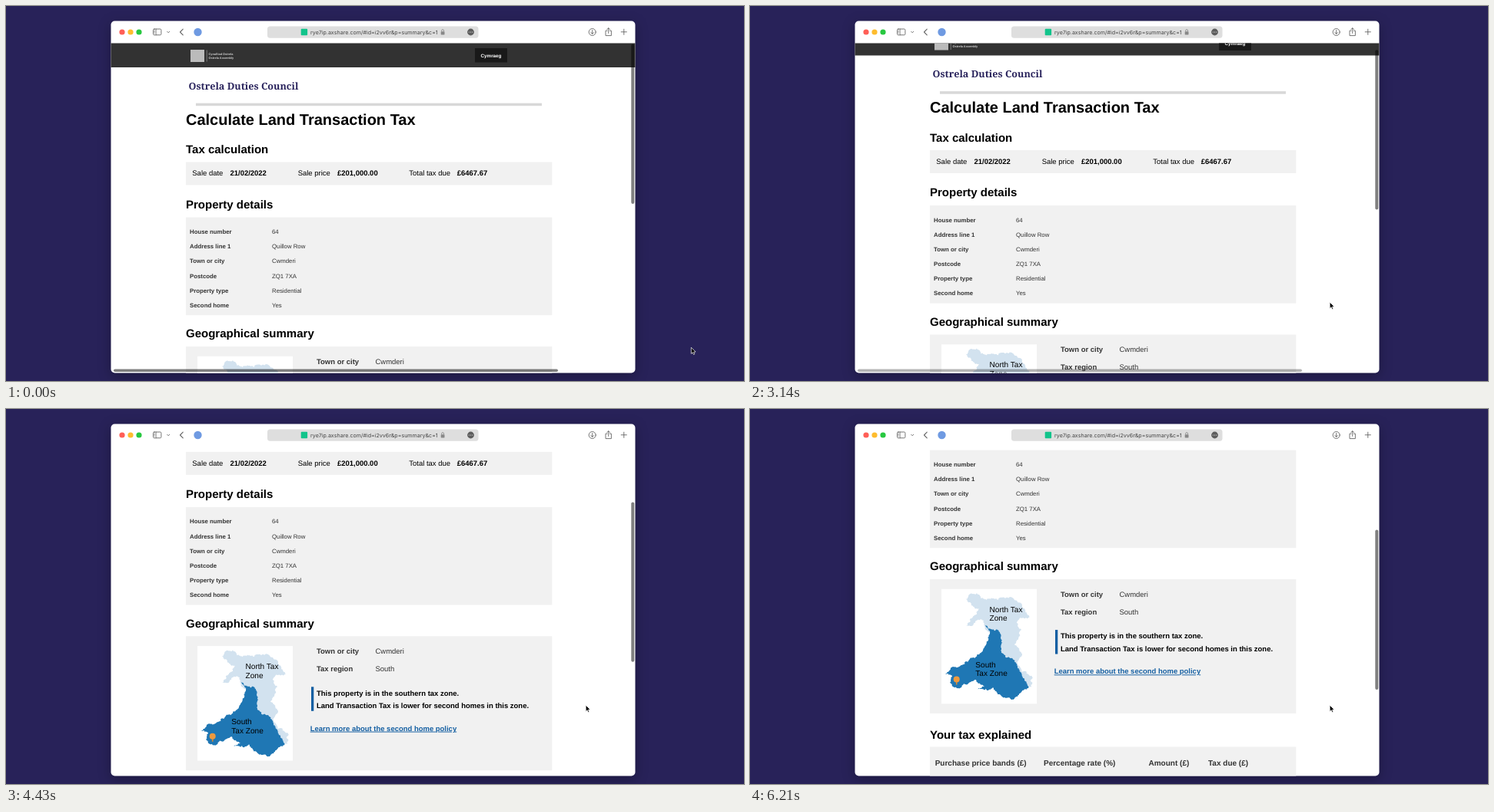
These frames come from a looping animation (960 by 489 pixels, 6.43 s). An HTML page:

```html
<!DOCTYPE html>
<html lang="en">
<head>
<meta charset="utf-8">
<title>Land Transaction Tax summary</title>
<style>
  html, body { margin: 0; width: 100%; height: 100%; overflow: hidden; background: #282259; }
  svg { display: block; width: 100vw; height: 100vh; }
  text { font-family: "Liberation Sans", Arial, sans-serif; text-rendering: geometricPrecision; }
  .bold, .bold text { font-weight: 700; }
  .title { font-size: 20px; }
  .heading { font-size: 15px; }
  .body { font-size: 9.47px; }
  .small { font-size: 7.8px; fill: #333; }
  .columns { font-size: 10px; fill: #333; }
  .label { font-size: 10.1px; }
  .brand { font: 700 12.6px "Noto Serif", serif; fill: #29235c; }
  .url { font: 7.1px Inter, sans-serif; fill: #444; }
  .panel { fill: #f1f1f1; }
  .icon { fill: none; stroke: #666; stroke-width: .9; stroke-linecap: round; stroke-linejoin: round; }
  .thumb { fill: #000; fill-opacity: .5; }
  .window { filter: drop-shadow(0 4px 8px rgba(0, 0, 0, .3)); }
</style>
</head>
<body>
<svg viewBox="0 0 960 489">
  <defs>
    <clipPath id="view"><path d="M136.5 48.5H818.5V473.5a5 5 0 0 1-5 5H141.5a5 5 0 0 1-5-5Z"/></clipPath>
  </defs>
  <rect class="window" x="136.5" y="19.5" width="682" height="459" rx="5" fill="#fff"/>

  <g clip-path="url(#view)">
    <g id="page">
      <rect x="136" y="48" width="683" height="32" fill="#323232"/>
      <rect x="240" y="57" width="18" height="16" fill="#bbb"/>
      <path d="M261.2 57.5V72.5" stroke="#aaa" stroke-width=".6"/>
      <g class="bold" fill="#ccc" font-size="3.9">
        <text x="263.5" y="64">Cynulliad Ostrela</text>
        <text x="263.5" y="69.3">Ostrela Assembly</text>
      </g>
      <rect x="610" y="55" width="42" height="18.5" fill="#191919"/>
      <text class="bold" x="631" y="66.6" font-size="6.3" fill="#fff" text-anchor="middle">Cymraeg</text>

      <text class="brand" x="237.5" y="108.5">Ostrela Duties Council</text>
      <rect x="247" y="126.7" width="450" height="3.5" fill="#d8d8d8"/>
      <text class="title bold" x="234" y="154.5">Calculate Land Transaction Tax</text>

      <g class="heading bold">
        <text x="234" y="192">Tax calculation</text>
        <text x="234" y="263.8">Property details</text>
        <text x="234" y="432.3">Geographical summary</text>
        <text x="234" y="652.3">Your tax explained</text>
      </g>
      <g class="panel">
        <rect x="234" y="203.5" width="476.3" height="30"/>
        <rect x="234" y="275.6" width="476.3" height="127.6"/>
        <rect x="234" y="444" width="476.3" height="175"/>
        <rect x="234" y="662.5" width="476.3" height="60"/>
      </g>

      <g class="body">
        <text x="242.3" y="221.3">Sale date</text>
        <text x="379.7" y="221.3">Sale price</text>
        <text x="524.3" y="221.3">Total tax due</text>
        <g class="bold">
          <text x="291.5" y="221.3">21/02/2022</text>
          <text x="431" y="221.3">£201,000.00</text>
          <text x="586.7" y="221.3">£6467.67</text>
        </g>
      </g>
      <g id="details" class="small"></g>

      <rect x="249" y="456.8" width="124" height="149.5" fill="#fff"/>
      <g transform="translate(0 148)">
        <path id="north" fill="#d2e2ef"/>
        <path id="south" fill="#1f77b4"/>
        <path d="M268.7 427V433.5" stroke="#d98a35" stroke-width="1.6"/>
        <circle cx="268.7" cy="426.5" r="4" fill="#ee9a3e"/>
      </g>
      <g class="label">
        <text x="311.5" y="486.6">North Tax</text>
        <text x="311.5" y="498.4">Zone</text>
        <text x="293.3" y="558.6">South</text>
        <text x="293.3" y="570.3">Tax Zone</text>
      </g>

      <g class="body" fill="#333">
        <text class="bold" x="404" y="466.8">Town or city</text>
        <text x="480.5" y="466.8">Cwmderi</text>
        <text class="bold" x="404" y="489.8">Tax region</text>
        <text x="480.5" y="489.8">South</text>
      </g>
      <rect x="397" y="510" width="3.3" height="31.5" fill="#145fa2"/>
      <g class="body bold">
        <text x="404" y="521.3">This property is in the southern tax zone.</text>
        <text x="404" y="537.8">Land Transaction Tax is lower for second homes in this zone.</text>
        <text x="395.7" y="567.3" fill="#145fa2" text-decoration="underline">Learn more about the second home policy</text>
      </g>
      <g class="columns bold">
        <text x="240.7" y="686.5">Purchase price bands (£)</text>
        <text x="382" y="686.5">Percentage rate (%)</text>
        <text x="518.5" y="686.5">Amount (£)</text>
        <text x="596" y="686.5">Tax due (£)</text>
      </g>
    </g>
    <rect class="thumb" id="across" x="140" y="473.4" width="578" height="3.6" rx="1.8"/>
    <rect class="thumb" id="down" x="813.3" width="4" height="208.3" rx="2"/>
  </g>

  <!-- Browser toolbar -->
  <circle cx="151" cy="34" r="3.6" fill="#ff5f57"/>
  <circle cx="162" cy="34" r="3.6" fill="#febc2e"/>
  <circle cx="173" cy="34" r="3.6" fill="#28c840"/>
  <circle cx="249.5" cy="34" r="5.2" fill="#6f9ae2"/>
  <rect x="340" y="26.5" width="274.5" height="15.3" rx="3.5" fill="#dedede"/>
  <rect x="383.7" y="29.8" width="8.4" height="8.4" rx="1" fill="#12c48b"/>
  <text class="url" x="396" y="36.5">rye7ip.axshare.com/#id=i2vv6r&amp;p=summary&amp;c=1</text>
  <rect x="565.7" y="33.2" width="4.8" height="4.2" rx=".6" fill="#888"/>
  <path d="M566.7 33.4V32a1.4 1.4 0 0 1 2.8 0V33.4" fill="none" stroke="#888" stroke-width=".8"/>
  <circle cx="604.5" cy="34" r="4.4" fill="#5c5c5c"/>
  <path d="M602.3 34h.01M604.5 34h.01M606.7 34h.01" stroke="#fff" stroke-width="1.1" stroke-linecap="round"/>
  <g class="icon">
    <rect x="191.5" y="30" width="10.4" height="7.8" rx="1.4"/>
    <path d="M195.2 30V37.8M192.9 32h.9M192.9 33.6h.9M192.9 35.2h.9" stroke-width=".7"/>
    <path d="M209.7 33.3l1.5 1.5 1.5-1.5"/>
    <path d="M230.2 30.2l-3.7 3.8 3.7 3.8" stroke-width="1.1"/>
    <circle cx="762.7" cy="34" r="4.5"/>
    <path d="M762.7 31.5V36.3M760.9 34.6l1.8 1.8 1.8-1.8"/>
    <path d="M782 32.2H780V38.6H787.4V32.2H785.4M783.7 35.5V28.8M781.9 30.5l1.8-1.8 1.8 1.8"/>
    <path d="M800.2 33.8H807.4M803.8 30.2V37.4"/>
  </g>
  <path id="cursor" d="M0 0V8.2L1.9 6.5 3.1 9.3 4.5 8.7 3.3 6 5.8 5.8Z" fill="#000" stroke="#fff" stroke-width=".7"/>
</svg>

<script>
const LOOP = 6430, STEP = 1000 / 7;
const $ = id => document.getElementById(id);

const details = [
  ["House number", "64"], ["Address line 1", "Quillow Row"], ["Town or city", "Cwmderi"],
  ["Postcode", "ZQ1 7XA"], ["Property type", "Residential"], ["Second home", "Yes"]
];
$("details").innerHTML = details.map(([name, value], i) => {
  const y = 297.1 + i * 19.15;
  return `<text class="bold" x="239" y="${y}">${name}</text><text x="346" y="${y}">${value}</text>`;
}).join("");

// Coastlines: a rough outline with seeded midpoint displacement.
let seed = 41;
const random = () => (seed = seed * 16807 % 2147483647) / 2147483647 - .5;
function coast(outline) {
  let points = outline.split(" ").map(p => p.split(",").map(Number));
  for (let round = 1; round <= 3; round++) {
    points = points.flatMap(([x, y], i) => {
      const [nx, ny] = points[(i + 1) % points.length], shift = random() * .25 * round;
      return [[x, y], [(x + nx) / 2 + (ny - y) * shift, (y + ny) / 2 - (nx - x) * shift]];
    });
  }
  return "M" + points.map(p => p.map(v => v.toFixed(1))).join("L") + "Z";
}
$("north").setAttribute("d", coast("281,322 285,316 295,314 301,321 308,323 316,321 323,323 338,319 354,331 358,338 364,345 350,348 347,353 353,362 349,374 344,381 350,388 354,393 348,406 353,416 359,416 367,423 366,436 360,439 340,412 322,394 316,366 307,362 304,350 293,351 288,357 280,357 287,347 294,342 298,335 292,334 287,327"));
$("south").setAttribute("d", coast("306,356 313,361 322,362 326,372 327,381 327,390 335,398 343,401 348,411 353,418 357,428 362,438 353,443 346,449 341,453 331,450 322,446 316,437 310,441 296,440 305,435 297,432 294,427 280,433 270,438 264,436 260,431 263,422 254,419 264,410 270,411 281,403 294,397 301,391 306,383 310,375 312,367"));

const clamp = v => Math.min(1, Math.max(0, v));
const mix = (a, b, u) => a + (b - a) * u;
const smooth = u => u * u * (3 - 2 * u);
const easeOut = (t, start, length, power) => 1 - (1 - clamp((t - start) / length)) ** power;

function scrollAt(t) {
  if (t < 3100) return 0;
  return 15.5 + 132.2 * easeOut(t, 3143, 1286, 1.32) + 74.3 * easeOut(t, 4800, 1410, 2.6);
}

function cursorAt(t) {
  if (t < 1100) return [891.3, 445.2];
  const drift = clamp((t - 1571) / 286), travel = smooth(clamp((t - 2000) / 571));
  return [mix(mix(861.6, 856.8, drift), 754.2, travel), mix(mix(430.6, 431.8, drift), 386.2, travel)];
}

function draw(now) {
  const t = Math.floor((now % LOOP + 5) / STEP) * STEP;
  const scroll = scrollAt(t);
  $("page").setAttribute("transform", `translate(0 ${-scroll})`);
  $("down").setAttribute("y", 49.7 + scroll * .486);
  // The horizontal bar fades away once the page scrolls.
  $("across").setAttribute("opacity", 1 - clamp((t - 3060) / 200));
  $("cursor").setAttribute("transform", `translate(${cursorAt(t)})`);
}

const start = performance.now();
function tick() {
  draw(performance.now() - start);
  requestAnimationFrame(tick);
}
tick();
</script>
</body>
</html>
```
